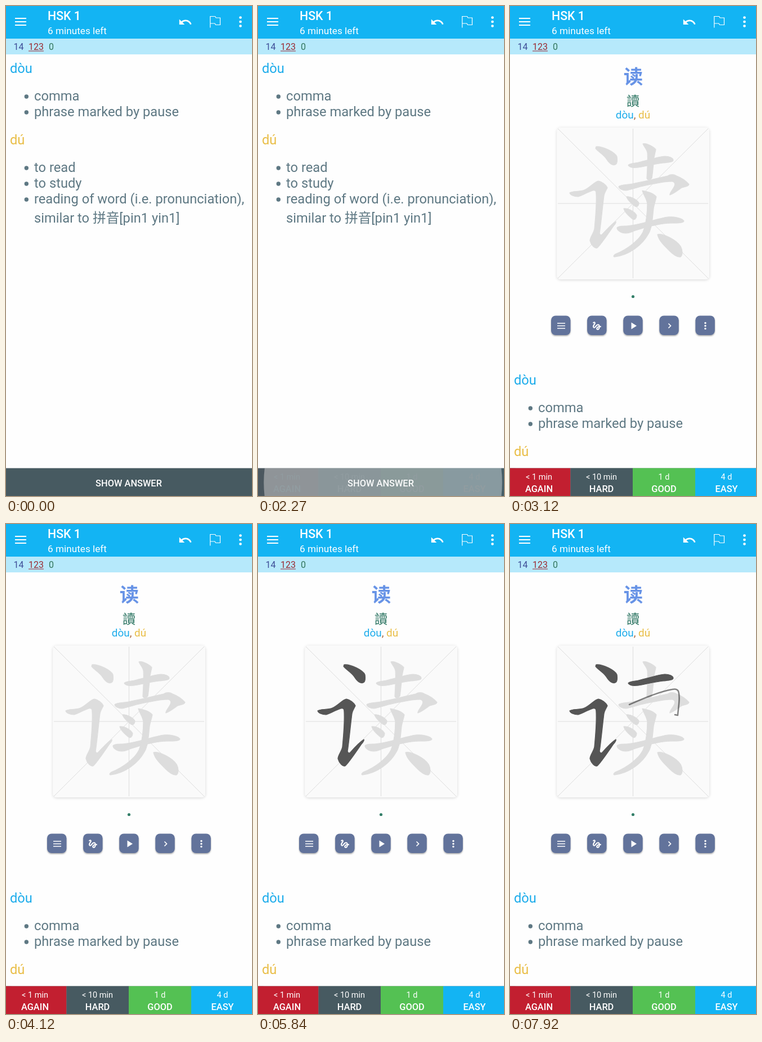
An HTML page that plays this animation: 437 by 871 pixels, repeating every 8 s.

```html
<!DOCTYPE html>
<html lang="zh-Hans">
<head>
<meta charset="utf-8">
<title>Flashcard</title>
<style>
html, body { margin: 0; width: 100%; height: 100%; overflow: hidden; background: #fefefe; }
svg { display: block; width: 100%; height: 100%; }
text { font-family: Roboto, "Noto Sans CJK SC", "Noto Sans CJK", sans-serif; }
.mid { text-anchor: middle; }
.def { font-size: 23.7px; fill: #5e7883; }
.btn { font-size: 16.4px; font-weight: 500; fill: #fff; text-anchor: middle; }
.when { font-size: 14.5px; fill: #fff; text-anchor: middle; }
.blue { fill: #1caceb; }
.gold { fill: #e9be47; }
.brush { stroke-width: 1.2; stroke-linejoin: round; }
.ink path { fill: none; stroke: #333; stroke-width: 2.5; stroke-linecap: round; stroke-linejoin: round; }
.icon { fill: none; stroke: #fff; stroke-width: 1.7; }
</style>
</head>
<body>
<svg viewBox="0 0 437 871" preserveAspectRatio="none">
  <defs>
    <filter id="soft" x="-20%" y="-20%" width="140%" height="140%">
      <feDropShadow dx="0" dy="1" stdDeviation="2.5" flood-color="#000" flood-opacity=".16"/>
    </filter>
    <filter id="drop" x="-20%" y="-20%" width="140%" height="150%">
      <feDropShadow dx="0" dy="1.5" stdDeviation="1.2" flood-color="#000" flood-opacity=".35"/>
    </filter>
    <clipPath id="bar"><rect y="821.5" width="437" height="49.5"/></clipPath>
  </defs>
  <rect width="437" height="871" fill="#fefefe"/>

  <g id="defs" class="def"></g>

  <g id="answer">
    <rect y="86" width="437" height="736" fill="#fefefe"/>
    <use href="#defs" y="554"/>
    <text class="mid" x="219" y="137.5" font-size="34.5" font-weight="700" fill="#6793e6">读</text>
    <text class="mid" x="218.5" y="176.5" font-size="23" fill="#2b7461" lang="zh-Hant">讀</text>
    <text class="mid" x="218.5" y="199.5" font-size="18.9"><tspan class="blue">dòu</tspan><tspan fill="#a8643c">,</tspan> <tspan class="gold">dú</tspan></text>
    <rect x="83.5" y="216" width="270.5" height="270" rx="7" fill="#fafafa" filter="url(#soft)"/>
    <path d="M218.5 218V484M85 351H352M85 218L352 484M352 218L85 484" fill="none" stroke="#ddd"/>
    <g id="pale" class="brush" fill="#ddd" stroke="#ddd">
      <path d="M153 250C165 249 187 260 190 268C191 275 190 281 187 282C183 284 177 281 172 273C167 264 155 258 152 253Z"/>
      <path d="M106 332C112 328 122 331 132 327C142 323 150 312 157 311C163 312 171 318 173 323C171 328 168 331 167 337C164 360 162 385 159 404C160 407 162 408 164 406C170 399 180 388 188 383C189 384 187 388 184 391C175 404 161 425 155 430C151 432 144 425 142 417C142 411 149 403 150 396C152 375 154 350 153 333C153 328 151 327 147 328C138 331 128 337 121 339C114 339 107 336 106 332Z"/>
      <path d="M210 283C212 279 222 280 232 277C247 274 262 268 275 267C283 267 290 270 290 274C289 278 281 278 272 279C255 281 240 285 228 287C220 288 212 287 210 283Z"/>
      <path d="M236 245C241 243 254 249 259 255C258 262 255 268 255 280C254 290 253 300 252 306C249 310 244 310 243 306C244 290 245 270 244 260C242 253 238 250 236 245Z"/>
      <path d="M193 321C196 317 210 318 222 315C245 311 265 305 280 302C285 299 291 299 296 302C304 305 313 311 318 317C317 321 311 321 305 323C298 328 292 333 284 336C283 334 287 329 290 324C294 318 294 314 289 312C275 311 250 317 232 321C222 324 212 327 206 328C200 328 194 325 193 321Z"/>
      <path d="M207 339C213 338 225 343 229 350C229 355 226 358 222 356C217 352 209 346 207 339Z"/>
      <path d="M202 360C210 359 221 365 225 372C225 378 221 381 218 379C212 374 204 368 202 360Z"/>
      <path d="M190 394C193 390 204 392 215 390C235 388 260 378 280 375C292 374 306 377 309 382C308 386 298 386 288 386C265 386 235 395 220 400C212 404 205 405 199 403C194 401 190 398 190 394Z"/>
      <path d="M235 328C242 329 256 333 260 339C259 346 256 352 255 360C253 380 252 395 246 405C235 425 212 443 186 446C183 446 184 443 187 441C207 433 229 417 236 402C242 388 244 365 244 352C243 342 237 336 235 328Z"/>
      <path d="M262 406C272 404 295 415 303 427C307 434 307 442 303 446C297 447 290 442 283 435C274 426 264 417 262 406Z"/>
    </g>
    <g id="dark" class="brush" fill="#555" stroke="#555"></g>
    <g id="ink" class="ink"></g>
    <circle cx="218.5" cy="516.5" r="2.6" fill="#35806a"/>
    <g id="tools" fill="#62739b" filter="url(#drop)"></g>
    <path class="icon" d="M84 564H98M84 568.5H98M84 573H98"/>
    <path transform="translate(144.5 558.7) scale(.82)" fill="#fff" d="M4.6 6.9C5.3 6.2 6 5.5 6.3 5.7C6.8 5.9 6.3 6.7 6 7.2C5.7 7.6 3.1 11.1 3.1 13.5C3.1 16 5 17.600 7.100 16.900C9.500 16.200 12 10.700 14.300 10.700C15.900 10.700 15.900 11.700 16 12.500C12.200 13.100 10.600 16.200 10.600 17.900C10.600 19.600 12.100 21 13.900 21C15.500 21 18.100 19.600 18.500 14.900H21V12.400H18.500C18.400 10.700 17.400 8.200 14.500 8.200C12.200 8.200 10.300 10.100 9.500 11C8.500 12.300 6.900 14.600 6.200 14.600C5.700 14.600 5.400 13.800 5.800 12.700C6.700 10 9 8.300 9 5.900C9 3.700 7.300 3 6.400 3C4.900 3 3.700 4.200 2.800 5.200ZM13.900 18.500C13.600 18.500 13.100 18.300 13.100 17.800C13.100 17.200 13.900 15.600 16 15C15.700 17.700 14.600 18.500 13.900 18.500Z"/>
    <path d="M215.5 562.5V574.5L225 568.5Z" fill="#fff"/>
    <path class="icon" d="M281.5 564.5L285.5 568.5L281.5 572.5"/>
    <g fill="#fff"><circle cx="347" cy="563.5" r="1.7"/><circle cx="347" cy="568.5" r="1.7"/><circle cx="347" cy="573.5" r="1.7"/></g>
  </g>

  <rect y="821.5" width="437" height="49.5" fill="#475a61"/>
  <circle id="ripple" cx="222" cy="847" fill="#fff" clip-path="url(#bar)"/>
  <g id="grades"></g>
  <text id="label" class="btn" x="218" y="854">SHOW ANSWER</text>

  <rect width="437" height="58" fill="#13b4f3"/>
  <rect y="58" width="437" height="28" fill="#b6e9fb"/>
  <path d="M16 22H36M16 28H36M16 34H36" stroke="#fff" stroke-width="2"/>
  <text x="74" y="25.4" font-size="21.3" font-weight="500" fill="#fff">HSK 1</text>
  <text x="74" y="50" font-size="17.2" fill="#fff">6 minutes left</text>
  <path transform="translate(305.7 16) scale(1.063)" fill="#fff" d="M12.5 8c-2.65 0-5.05.99-6.9 2.6L2 7v9h9l-3.62-3.62c1.39-1.16 3.16-1.88 5.12-1.88 3.54 0 6.55 2.31 7.6 5.5l2.37-.78C21.08 11.03 17.15 8 12.5 8z"/>
  <path d="M362.8 38.5V18.5H371.5L373 21H380.5V33.5H372.5L371 31H362.8" fill="none" stroke="#fff" stroke-width="1.2"/>
  <g fill="#fff"><circle cx="416.5" cy="20.5" r="2.3"/><circle cx="416.5" cy="28" r="2.3"/><circle cx="416.5" cy="35.5" r="2.3"/></g>
  <g font-size="16">
    <text x="13.5" y="78" fill="#3c4c96">14</text>
    <text x="40" y="78" fill="#9b2b32">123</text>
    <path d="M40 80H67" stroke="#9b2b32"/>
    <text x="76" y="78" fill="#32765c">0</text>
  </g>
</svg>
<script>
const LOOP = 8000, NS = 'http://www.w3.org/2000/svg';
const $ = id => document.getElementById(id);

function add(parent, tag, attrs, text) {
  const el = document.createElementNS(NS, tag);
  for (const k in attrs) el.setAttribute(k, attrs[k]);
  if (text) el.textContent = text;
  return parent.appendChild(el);
}

// Dictionary entries: baseline, text, heading class, continuation line
[
  [118.5, 'dòu', 'blue'],
  [168, 'comma'],
  [196, 'phrase marked by pause'],
  [245.5, 'dú', 'gold'],
  [295, 'to read'],
  [323, 'to study'],
  [351, 'reading of word (i.e. pronunciation),'],
  [385, 'similar to 拼音[pin1 yin1]', '', true]
].forEach(([y, text, cls, wrapped]) => {
  add($('defs'), 'text', { x: cls ? 7 : 50, y, class: cls || '' }, text);
  if (!cls && !wrapped) add($('defs'), 'circle', { cx: 36.3, cy: y - 7, r: 3.7 });
});

for (let i = 0; i < 5; i++)
  add($('tools'), 'rect', { x: 73 + i * 64.1, y: 550.5, width: 34.5, height: 34.5, rx: 8 });

[
  [0, 107.5, 51.5, '#c21f30', '< 1 min', 'AGAIN'],
  [107.5, 110.5, 162.5, '#475a61', '< 10 min', 'HARD'],
  [218, 111, 273.5, '#54c153', '1 d', 'GOOD'],
  [329, 108, 384.5, '#13b4f3', '4 d', 'EASY']
].forEach(([x, width, mid, fill, when, name]) => {
  const g = $('grades');
  add(g, 'rect', { x, y: 821.5, width, height: 49.5, fill });
  add(g, 'text', { x: mid, y: 842, class: 'when' }, when);
  add(g, 'text', { x: mid, y: 863.8, class: 'btn' }, name);
});

// Finger trails: start, release, path, accepted
const strokes = [
  [4670, 4820, 'M157 255C168 260 178 267 184 277', true],
  [5060, 5460, 'M122 341C137 336 150 330 163 323Q165 322 165 327L159 393L156 425L184 390', true],
  [6385, 6465, 'M217 283C240 279 262 274 283 273', true],
  [7230, 7790, 'M212 321C235 311 265 298 288 294Q296 292 299 297C303 308 299 325 298 340L293 339', false]
].map(([from, to, d, ok], i) => ({
  from, to,
  line: add($('ink'), 'path', { d, pathLength: 1, 'stroke-dasharray': '1 2' }),
  fill: ok && $('dark').appendChild($('pale').children[i].cloneNode())
}));

const part = (t, a, b) => Math.min(1, Math.max(0, (t - a) / (b - a)));
const ease = p => 0.5 - Math.cos(p * Math.PI) / 2;

function draw(t) {
  $('answer').style.display = t < 2400 ? 'none' : '';

  const grow = part(t, 1880, 2300);
  $('ripple').setAttribute('r', 214 * (1 - (1 - grow) ** 1.7));
  $('ripple').setAttribute('opacity', 0.38 * part(t, 1880, 1960));
  const swap = ease(part(t, 2245, 2460));
  $('grades').setAttribute('opacity', swap);
  $('label').setAttribute('opacity', 1 - swap);

  for (const s of strokes) {
    const fade = ease(part(t, s.to, s.to + 300));
    s.line.setAttribute('stroke-dashoffset', 1 - part(t, s.from, s.to));
    s.line.setAttribute('opacity', t <= s.from ? 0 : 1 - fade);
    if (s.fill) s.fill.setAttribute('opacity', ease(part(t, s.to + 10, s.to + 410)));
  }
}

const start = performance.now();
function tick() {
  draw((performance.now() - start) % LOOP);
  requestAnimationFrame(tick);
}
tick();
</script>
</body>
</html>
```
